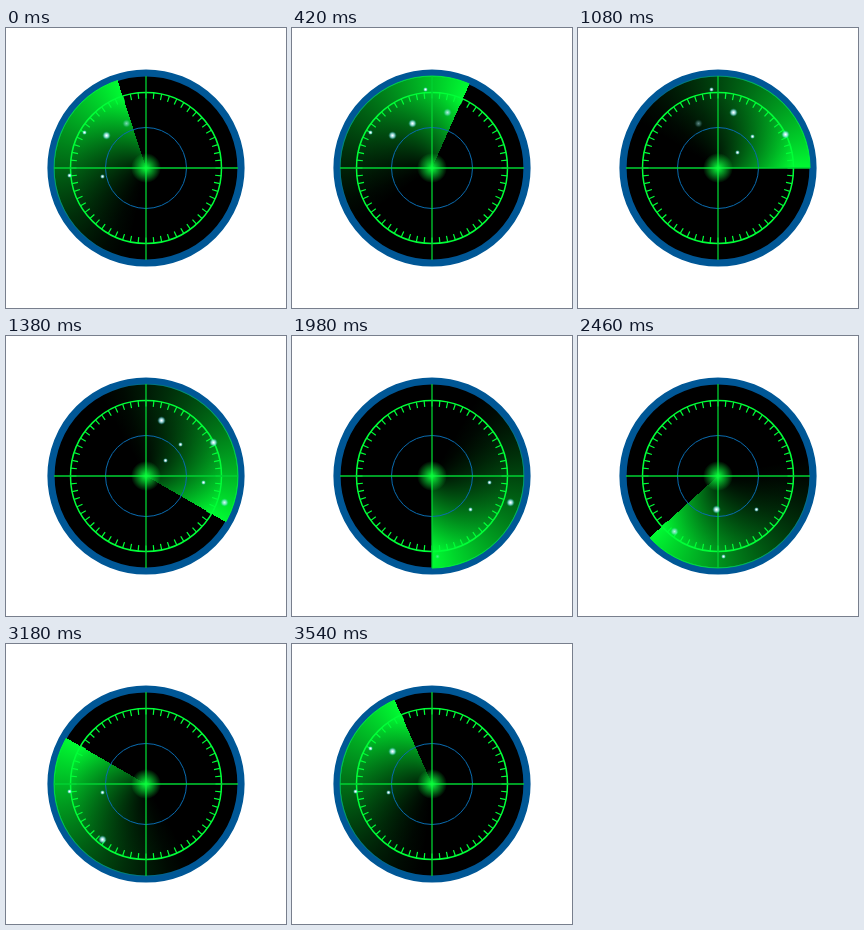
An HTML page with a canvas that plays this animation: 280x280 px, repeating every 3.6 s.

```html
<!DOCTYPE html>
<html lang="en">
<head>
<meta charset="utf-8">
<title>Radar</title>
<style>
html, body { margin: 0; width: 100%; height: 100%; overflow: hidden; background: #fff; }
canvas { display: block; }
</style>
</head>
<body>
<canvas id="stage" width="280" height="280"></canvas>
<script>
const ctx = document.getElementById('stage').getContext('2d');
const C = 140, STEP = 60, LOOP = 3600, TAIL = 150;
const GREEN = '#00ff38';
const rad = deg => deg * Math.PI / 180;
const clamp = v => Math.max(0, Math.min(1, v));

const large = '100,107 120,95 155,84 207,106 218,166 138,173 96,195';
const small = '78,104 133,61 174,108 159,124 197,146 178,173 145,220 96,148 63,147';
const parse = (text, size) => text.split(' ').map(pair => {
  const [x, y] = pair.split(',').map(Number);
  return { x: x + .5, y: y + .5, size, angle: Math.atan2(x - C, C - y) / rad(1) };
});
const blips = [...parse(large, 3.8), ...parse(small, 2.2)];

function circle(x, y, r) {
  ctx.beginPath();
  ctx.arc(x, y, r, 0, rad(360));
}

function disc(x, y, r, fill) {
  circle(x, y, r);
  ctx.fillStyle = fill;
  ctx.fill();
}

function ring(r, width, color) {
  circle(C, C, r);
  ctx.strokeStyle = color;
  ctx.lineWidth = width;
  ctx.stroke();
}

// Disc that fades linearly from the given alpha to nothing at its rim
function glow(x, y, r, rgb, alpha = 1) {
  const g = ctx.createRadialGradient(x, y, 0, x, y, r);
  g.addColorStop(0, `rgba(${rgb},${alpha})`);
  g.addColorStop(1, `rgba(${rgb},0)`);
  disc(x, y, r, g);
}

// Line along a radius, from r1 to r2
function spoke(deg, r1, r2, width, color) {
  const c = Math.cos(rad(deg)), s = Math.sin(rad(deg));
  ctx.strokeStyle = color;
  ctx.lineWidth = width;
  ctx.beginPath();
  ctx.moveTo(C + c * r1, C + s * r1);
  ctx.lineTo(C + c * r2, C + s * r2);
  ctx.stroke();
}

// Bright leading edge with a tail, dimmed toward the centre
function drawSweep(lead) {
  const tail = ctx.createConicGradient(rad(lead - 90), C, C);
  for (let behind = TAIL; behind >= 0; behind -= 15) {
    const alpha = (1 - behind / TAIL) ** 1.4;
    tail.addColorStop(1 - behind / 360, `rgba(0,250,50,${alpha})`);
  }
  disc(C, C, 92, tail);
  glow(C, C, 74, '0,0,0', .8);
  ring(92, 1, tail);
}

function drawGrid() {
  ring(40.5, 1, '#0a6cb0');
  ring(75.5, 1.5, GREEN);
  for (let deg = 0; deg < 360; deg += 6) spoke(deg, 69.5, 75.5, 1.2, GREEN);
  for (let deg = 0; deg < 360; deg += 90) spoke(deg, 0, 92, 1.3, '#00d232');
  glow(C, C, 15, '10,255,60');
}

function drawBlips(lead) {
  for (const { x, y, size, angle } of blips) {
    const behind = (lead - angle + 720) % 360;
    ctx.globalAlpha = clamp(behind / 15) * clamp((116 - behind) / 7);
    glow(x, y, size * 1.15, '80,225,255');
    glow(x, y, size * .9, '255,255,255');
  }
  ctx.globalAlpha = 1;
}

function draw(now) {
  const lead = Math.floor((now % LOOP) / STEP) * 6 - 18;
  ctx.fillStyle = '#fff';
  ctx.fillRect(0, 0, 280, 280);
  disc(C, C, 95, '#000');
  ring(95, 7.2, '#005796');
  drawSweep(lead);
  drawGrid();
  drawBlips(lead);
}

const start = performance.now();
function tick() {
  draw(performance.now() - start);
  requestAnimationFrame(tick);
}
tick();
</script>
</body>
</html>
```
